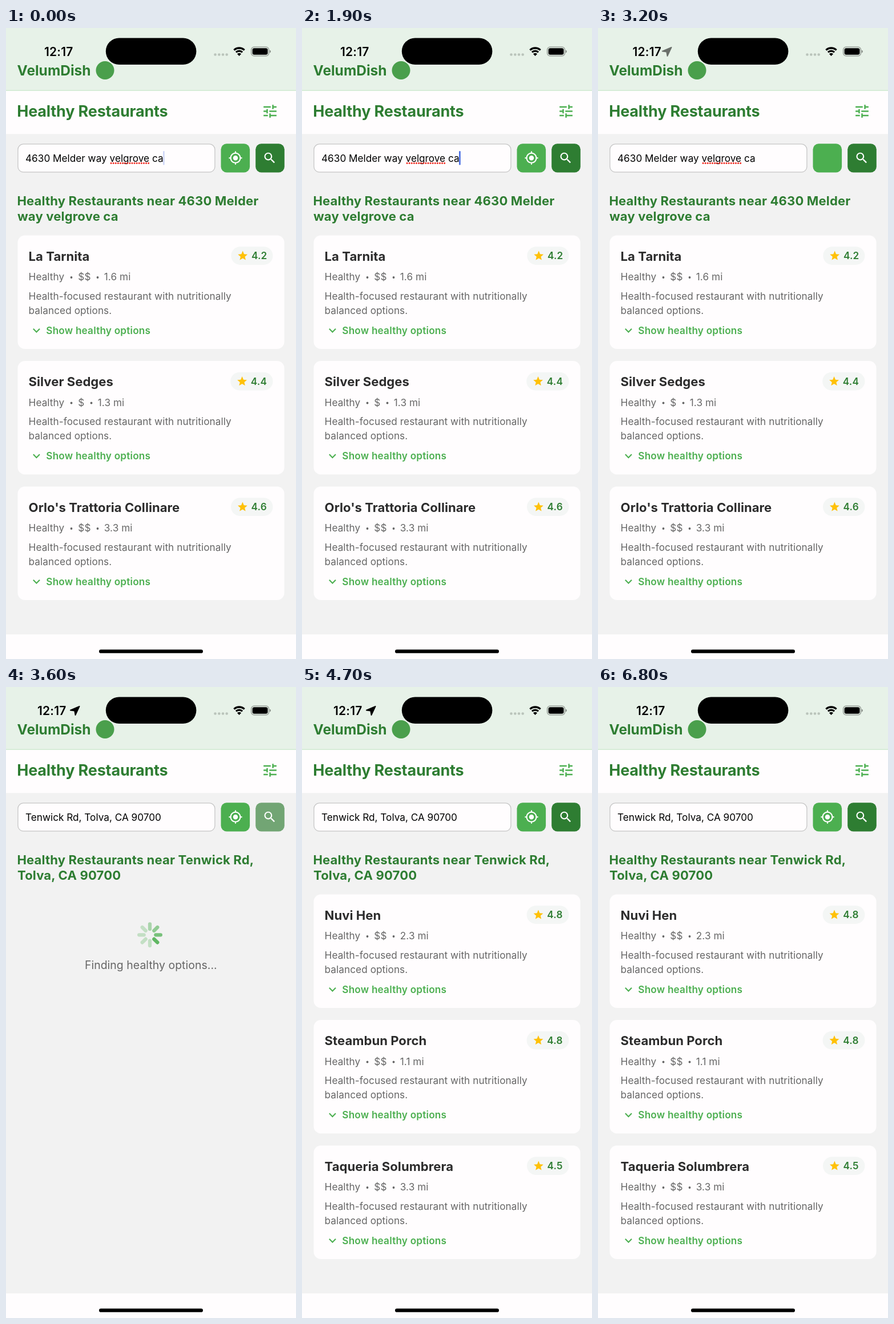
Write an HTML page that moves like this. It is 508 px wide and 1103 px high and loops after 6.9 s.

```html
<!DOCTYPE html>
<html lang="en">
<head>
<meta charset="utf-8">
<title>Healthy Restaurants</title>
<style>
  html, body { margin: 0; width: 100%; height: 100%; overflow: hidden; background: #f2f2f2; }
  svg { display: block; width: 508px; height: 1103px; }
  text { font-family: Inter, "Liberation Sans", sans-serif; font-optical-sizing: none; white-space: pre; }
  .brand { font-size: 24.5px; font-weight: 700; fill: #2e7d32; }
  .title { font-size: 27px; font-weight: 700; letter-spacing: -.007em; fill: #2e7d32; }
  .near { font-size: 22.07px; font-weight: 700; letter-spacing: .007em; fill: #2e7d32; }
  .name { font-size: 22.07px; font-weight: 700; letter-spacing: .002em; fill: #2c2c2c; }
  .body { font-size: 17.15px; letter-spacing: .005em; fill: #666; }
  .link { font-size: 17.15px; font-weight: 600; letter-spacing: .0125em; fill: #4caf50; }
  .rate { font-size: 17.15px; font-weight: 600; letter-spacing: .01em; fill: #2e7d32; }
  .field { font-size: 17.2px; fill: #000; }
  .wait { font-size: 19.4px; letter-spacing: .003em; fill: #666; text-anchor: middle; }
  .clock { font-size: 20.9px; font-weight: 600; letter-spacing: .01em; fill: #000; }
</style>
</head>
<body>
<svg id="stage" viewBox="0 0 508 1103" xmlns="http://www.w3.org/2000/svg"></svg>
<script>
const LOOP = 6900, STEP = 100;
const GREEN = '#4caf50', DARK = '#2e7d32', WHITE = '#fffdfe';

const ICONS = {
  tune: 'M3 17v2h6v-2H3zM3 5v2h10V5H3zm10 16v-2h8v-2h-8v-2h-2v6h2zM7 9v2H3v2h4v2h2V9H7zm14 4v-2H11v2h10zm-6-4h2V7h4V5h-4V3h-2v6z',
  locate: 'M12 8c-2.21 0-4 1.79-4 4s1.79 4 4 4 4-1.79 4-4-1.79-4-4-4zm8.94 3c-.46-4.17-3.77-7.48-7.94-7.94V1h-2v2.06C6.83 3.52 3.52 6.83 3.06 11H1v2h2.06c.46 4.17 3.77 7.48 7.94 7.94V23h2v-2.06c4.17-.46 7.48-3.77 7.94-7.94H23v-2h-2.06zM12 19c-3.87 0-7-3.13-7-7s3.13-7 7-7 7 3.13 7 7-3.13 7-7 7z',
  search: 'M15.5 14h-.79l-.28-.27C15.41 12.59 16 11.11 16 9.5 16 5.91 13.09 3 9.5 3S3 5.91 3 9.5 5.91 16 9.5 16c1.61 0 3.09-.59 4.23-1.57l.27.28v.79l5 4.99L20.49 19l-4.99-5zm-6 0C7.01 14 5 11.99 5 9.5S7.01 5 9.5 5 14 7.01 14 9.5 11.99 14 9.5 14z',
  star: 'M12 17.27 18.18 21l-1.64-7.03L22 9.24l-7.19-.61L12 2 9.19 8.63 2 9.24l5.46 4.73L5.82 21z',
  more: 'M16.59 8.59L12 13.17 7.41 8.59 6 10l6 6 6-6z'
};

const text = (cls, x, y, str) => `<text class="${cls}" x="${x}" y="${y}">${str}</text>`;
const rect = (x, y, w, h, r, fill, more = '') =>
  `<rect x="${x}" y="${y}" width="${w}" height="${h}" rx="${r}" fill="${fill}" ${more}/>`;
const dot = (x, y, r, fill) => `<circle cx="${x}" cy="${y}" r="${r}" fill="${fill}"/>`;
// Icon on a 24-unit grid, centred on (x, y)
const icon = (name, x, y, size, fill, more = '') => {
  const k = size / 24;
  return `<path d="${ICONS[name]}" fill="${fill}" transform="translate(${x - size / 2} ${y - size / 2}) scale(${k})" ${more}/>`;
};

// Each card: name, rating, pill left edge, price, distance
const card = ([name, rate, left, price, miles], i) => {
  const gap = price.length > 1 ? 160.5 : 149.5;
  return `<g transform="translate(0 ${i * 219.5})">
    ${rect(20.5, 362.5, 467, 198.5, 12.5, WHITE)}
    ${text('name', 39.6, 406.5, name)}
    ${rect(left, 382.3, 467.5 - left, 31.6, 15.8, '#f4f6f5')}
    ${icon('star', left + 20.4, 398, 20.2, '#ffc107')}
    ${text('rate', left + 35.6, 404.3, rate)}
    ${text('body', 39.6, 441, 'Healthy')}
    ${dot(114.5, 436, 1.9, '#666')}
    ${text('body', 126.3, 441, price)}
    ${dot(gap, 436, 1.9, '#666')}
    ${text('body', gap + 11.3, 441, miles + ' mi')}
    ${text('body', 39.6, 474.5, 'Health-focused restaurant with nutritionally')}
    ${text('body', 39.6, 499.7, 'balanced options.')}
    ${icon('more', 53.4, 528.7, 25.3, GREEN)}
    ${text('link', 70.3, 534.7, 'Show healthy options')}
  </g>`;
};

const OLD = {
  field: '4630 Melder way velgrove ca',
  near: ['Healthy Restaurants near 4630 Melder', 'way velgrove ca'],
  cards: [
    ['La Tarnita', '4.2', 394.3, '$$', '1.6'],
    ['Silver Sedges', '4.4', 393.2, '$', '1.3'],
    ["Orlo's Trattoria Collinare", '4.6', 394, '$$', '3.3']
  ]
};
const NEW = {
  field: 'Tenwick Rd, Tolva, CA 90700',
  near: ['Healthy Restaurants near Tenwick Rd,', 'Tolva, CA 90700'],
  cards: [
    ['Nuvi Hen', '4.8', 393.6, '$$', '2.3'],
    ['Steambun Porch', '4.8', 393.6, '$$', '1.1'],
    ['Taqueria Solumbrera', '4.5', 394, '$$', '3.3']
  ]
};

const place = (id, p) => `<g id="${id}">
  ${text('field', 34, 233.7, p.field)}
  ${text('near', 19.4, 309.5, p.near[0])}
  ${text('near', 20, 336.5, p.near[1])}
</g>`;

const wifiArc = (r, w) => {
  const dx = r * Math.sin(.76), dy = r * Math.cos(.76);
  return `<path d="M${408.5 - dx} ${48.2 - dy}A${r} ${r} 0 0 1 ${408.5 + dx} ${48.2 - dy}" fill="none" stroke="#000" stroke-width="${w}"/>`;
};

const spokes = Array.from({ length: 8 }, (_, i) =>
  `<line class="spoke" y1="-10.4" y2="-18.8" transform="rotate(${i * 45})"/>`).join('');

const stage = document.getElementById('stage');
stage.innerHTML = `
  ${rect(0, 0, 508, 1103, 0, '#f2f2f2')}
  ${rect(0, 0, 508, 109, 0, '#e7f2e8')}
  ${rect(0, 108.6, 508, 1.3, 0, '#c8e6c9')}
  ${rect(0, 109.9, 508, 75.3, 0, WHITE)}
  ${rect(0, 1060, 508, 43, 0, WHITE)}
  ${rect(163, 1086.5, 182, 6.3, 3.15, '#000')}
  ${text('brand', 19.6, 82.5, 'VelumDish')}
  ${dot(173.5, 74, 16, '#4a9f4c')}
  ${rect(174.8, 17.5, 158.6, 46.5, 23.25, '#000')}
  <g id="clock">${text('clock', 0, 48.8, '12:17')}</g>
  <path id="arrow" d="M128.6 33.9L112.8 40.6L120.2 41.7L121.5 49Z" stroke="#000" stroke-width="1.8" stroke-linejoin="round"/>
  ${[366.5, 373.3, 380, 386.7].map(x => dot(x, 46.5, 2.3, '#bac4bb')).join('')}
  ${wifiArc(13.2, 3.3)}${wifiArc(8.1, 3.2)}
  <path d="M408.5 49L404.9 45.2A5 5 0 0 1 412.1 45.2Z"/>
  ${rect(429.6, 33.2, 30.9, 15.6, 5, 'none', 'stroke="#000" stroke-opacity=".4" stroke-width="1.3"')}
  ${rect(431.6, 35.2, 26.9, 11.6, 3.3, '#000')}
  <path d="M461.9 38.4q2 .9 2 2.7t-2 2.7z" fill-opacity=".45"/>
  ${text('title', 19.2, 155, 'Healthy Restaurants')}
  ${icon('tune', 462.5, 145.5, 30.3, GREEN)}
  ${rect(20.9, 202.9, 345, 49, 9.5, WHITE, 'stroke="#c6c6c6" stroke-width="1.3"')}
  ${rect(376.5, 202.2, 50.6, 50.3, 10, GREEN)}
  ${icon('locate', 402, 227.2, 25.3, '#fff', 'id="locate"')}
  <g id="search">${rect(437.2, 202.2, 50.6, 50.3, 10, DARK)}</g>
  ${icon('search', 462, 227.2, 25.3, '#fff')}
  ${place('before', OLD)}
  ${place('after', NEW)}
  <line id="typo" y1="236.2" y2="236.2" stroke="#f02a20" stroke-width="3.1" stroke-linecap="round" stroke-dasharray="0 4.1"/>
  ${rect(0, 215, 2.6, 24.5, 1.3, '#3a62e2', 'id="caret"')}
  <g id="oldCards">${OLD.cards.map(card).join('')}</g>
  <g id="newCards">${NEW.cards.map(card).join('')}</g>
  <g id="wait">
    <g transform="translate(252 433.3)" stroke="${GREEN}" stroke-width="6.3" stroke-linecap="round">${spokes}</g>
    ${text('wait', 253.8, 493, 'Finding healthy options...')}
  </g>`;

const el = id => document.getElementById(id);
const show = (id, on) => el(id).setAttribute('display', on ? 'inline' : 'none');
const fade = (id, v) => el(id).setAttribute('opacity', v);
const ramp = (t, a, b) => {
  const p = Math.min(1, Math.max(0, (t - a) / (b - a)));
  return p * p * (3 - 2 * p);
};
const leaves = stage.querySelectorAll('.spoke');
const BLINK = [.25, 0, 0, .5, 1, 1, 1, 1, 1, .95];

// Keep the caret and the spelling mark attached to the typed text
function pin() {
  const line = stage.querySelector('#before .field');
  const start = line.getStartPositionOfChar(16).x, end = line.getEndPositionOfChar(23).x;
  el('typo').setAttribute('x1', start + 2.5);
  el('typo').setAttribute('x2', end - 1);
  el('caret').setAttribute('x', 33.5 + line.getComputedTextLength());
}

function draw(ms) {
  const t = Math.floor((ms % LOOP) / STEP) * STEP;
  const moved = t >= 3300, found = t >= 4200;

  show('before', !moved);
  show('typo', !moved);
  show('oldCards', !moved);
  show('after', moved);
  show('wait', moved && !found);
  show('newCards', found);
  show('locate', t < 2900 || moved);
  fade('caret', t < 2800 ? BLINK[(t % 1000) / STEP] : 0);
  fade('search', moved && t < 4100 ? .65 : 1);

  const slide = ramp(t, 2980, 3400) - ramp(t, 6250, 6800);
  el('clock').setAttribute('transform', `translate(${67 - 12 * slide} 0)`);
  fade('arrow', slide);

  const head = Math.floor(t / STEP) - 33;
  leaves.forEach((leaf, i) => {
    const behind = (((head - i) % 8) + 8) % 8;
    leaf.setAttribute('opacity', Math.max(.28, .88 - .15 * behind));
  });
}

pin();
document.fonts.ready.then(pin);
const begin = performance.now();
function tick() {
  draw(performance.now() - begin);
  requestAnimationFrame(tick);
}
tick();
</script>
</body>
</html>
```
